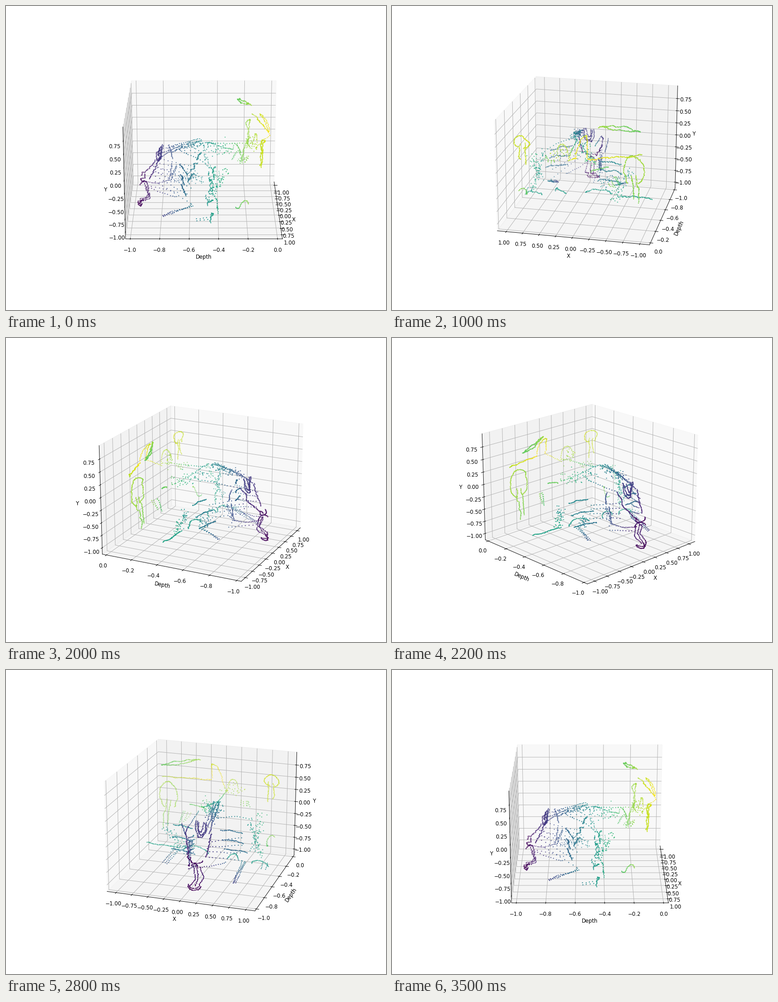
A matplotlib script that plays this animation: 837 by 669 pixels, repeating every 3600 ms.

```python
import numpy as np
import matplotlib.pyplot as plt
from matplotlib.animation import FuncAnimation

W, H, DPI = 837, 669, 83.7
FRAMES, ELEV = 36, 20
LIMITS = np.array([[-1.143, 1.137], [-1.033, 0.033], [-1.13, 1.01]])
SPAN, MID = LIMITS[:, 1] - LIMITS[:, 0], LIMITS.mean(axis=1)
BOX = np.array([1.1905, 1.1905, 0.8929])
SCALE, CX, CY, DIST = 2784.5, 435.9, 330.9, 10

rng = np.random.default_rng(4)
parts = []

# Camera of the front view in which the scene is sketched
e, a = np.radians(ELEV), np.radians(360 * 25 / 35)
FWD = np.array([np.cos(e) * np.cos(a), np.cos(e) * np.sin(a), np.sin(e)])
RIGHT = np.array([-np.sin(a), np.cos(a), 0])
UP = np.cross(FWD, RIGHT)


def lift(px, py, depth):
    """Turn front-view pixels with a known depth into data coordinates."""
    y = (depth - MID[1]) / SPAN[1] * BOX[1]
    ray = (-FWD + np.outer((px - CX) / SCALE, RIGHT)
           + np.outer((CY - py) / SCALE, UP))
    t = (y - DIST * FWD[1]) / ray[:, 1]
    return (DIST * FWD + t[:, None] * ray) / BOX * SPAN + MID


def wobble(n, size):
    """Smooth noise, so that strokes look hand drawn."""
    return size * np.convolve(rng.normal(size=n + 8), np.ones(9) / 3, "valid")


def add(px, py, depths, rough):
    n = len(px)
    depth = np.interp(np.linspace(0, 1, n),
                      np.linspace(0, 1, len(depths)), depths)
    depth = np.clip(depth + wobble(n, 0.006), -0.969, -0.031)
    parts.append(lift(px + wobble(n, 0.7) + rng.normal(0, rough, n),
                      py + wobble(n, 0.7) + rng.normal(0, rough, n), depth))


def trace(p, q, *depths, gap=1.4, bow=0, rough=0.25):
    """Dots from p to q, sagging by `bow` pixels in the middle."""
    (x0, y0), (x1, y1) = p, q
    t = np.linspace(0, 1, max(3, int(np.hypot(x1 - x0, y1 - y0) / gap)))
    add(x0 + (x1 - x0) * t, y0 + (y1 - y0) * t + bow * np.sin(np.pi * t),
        depths, rough)


def arc(cx, cy, rx, ry, start, stop, *depths, gap=1.4):
    """Dots on part of an ellipse, angles clockwise from the right."""
    length = np.radians(stop - start) * (rx + ry) / 2
    t = np.radians(np.linspace(start, stop, max(3, int(length / gap))))
    add(cx + rx * np.cos(t), cy + ry * np.sin(t), depths, 0.25)


def tree(cx, cy, rx, ry, half, foot, d, lean):
    arc(cx, cy, rx, ry, 110, 415, d, d + 0.02, d - 0.01, d)
    for side in (-1, 1):
        x = cx + side * half
        trace((x, cy + ry / 3), (x, foot - 4 * side), d, d - lean, gap=1.6)


def background():
    for bow in (-3, 4):
        trace((297, 229), (371, 203), -.25, -.23, -.17, bow=bow)
    tree(301, 294, 22, 30, 5, 366, -.175, .045)
    tree(522, 224, 17, 13, 6, 266, -.11, .0)

    # skyline with tower and hill
    trace((281, 256), (379, 245), -.14, -.04, bow=-1)
    arc(391, 241, 11, 31, 180, 360, -.035, -.1, -.035)
    trace((402, 242), (432, 264), -.04, -.13, gap=3)
    arc(444, 262, 15, 28, 180, 360, -.13, -.17, gap=3)
    trace((428, 262), (464, 250), -.2, -.13, gap=1.5, rough=8)

    # grass
    trace((364, 305), (399, 310), -.26, -.22, bow=-2)
    arc(540, 352, 6, 11, 60, 300, -.28, -.2)
    for i in range(4):
        trace((345 + 2 * i, 349 - 2 * i), (349 + 2 * i, 323 + i),
              -.3 + .02 * i, -.26 + .02 * i, gap=3)
    for i in range(5):
        trace((470 + 6 * i, 277), (473 + 6 * i, 286), -.18 - .015 * i,
              -.2 - .015 * i, gap=2.5)


def ground():
    trace((289, 406), (365, 403), -.42, -.44)
    for cx, rx, ry in ((412, 28, 11), (496, 13, 13), (552, 18, 8)):
        arc(cx, 404, rx, ry, 180, 350, -.46, -.44, -.47)
    for k in range(2):
        trace((567 - 8 * k, 398), (579 - 8 * k, 410), -.46, -.55, gap=3)

    # ledges on both sides and their feet
    for i in range(3):
        trace((370 + 2 * i, 353 + 27 * i), (418 + 7 * i, 354 + 27 * i),
              -.52 - .03 * i, -.56 - .03 * i, bow=-2)
        trace((502 + 3 * i, 343 + 20 * i), (540 + 6 * i, 341 + 20 * i),
              -.66, -.62, bow=-2)
    for k in range(3):
        trace((378 + 6 * k, 408), (378 + 6 * k, 438), -.56, -.72, gap=2.8)
        trace((533 + 5 * k, 403), (548 + 3 * k, 449), -.58, -.78, gap=2.8)


def body():
    # back, running away from the viewer
    for k in range(3):
        trace((505 - 9 * k, 353 - 14 * k), (475 - 6 * k, 285),
              -.83 + .04 * k, -.52, gap=1.8 + .3 * k, bow=-4)
    trace((470, 284), (398, 306), -.5, -.3, gap=3)
    trace((460, 285), (430, 260), -.46, -.14, gap=2)
    trace((492, 316), (532, 312), -.64, -.43, gap=3, bow=-5)

    # flanks
    trace((428, 344), (432, 368), -.76, -.72)
    trace((451, 347), (428, 312), -.8, -.52, gap=3)
    trace((533, 314), (546, 386), -.47, -.4, rough=3)
    for k in range(4):
        trace((507, 368 + 12 * k), (536, 352 + 16 * k), -.84, -.6, gap=2.8)
        trace((452, 372 + 11 * k), (424, 366 + 10 * k), -.82, -.56, gap=2.8)

    # loose dots
    trace((490, 322), (470, 290), -.74, -.5, gap=.6, rough=6)
    trace((455, 300), (400, 304), -.5, -.28, gap=1, rough=8)
    trace((352, 366), (366, 398), -.5, -.38, gap=.6, rough=7)
    trace((538, 300), (543, 376), -.34, -.48, gap=1.5, rough=5)
    trace((392, 404), (412, 394), -.62, -.5, gap=.8, rough=6)
    trace((440, 376), (446, 414), -.7, -.74, gap=1.5, rough=3)


def head():
    # ears and brow
    for k in range(3):
        arc(482, 330 + k, 14 - 4 * k, 35 - 7 * k, 0, 180, -.8, -.82, -.79)
    trace((451, 347), (456, 378), -.8, -.84)
    trace((456, 378), (480, 418), -.84, -.94)
    trace((507, 352), (507, 404), -.81, -.88)
    trace((441, 375), (446, 415), -.72, -.75, gap=2)
    trace((446, 415), (478, 430), -.75, -.93, gap=1.8, bow=5)

    # muzzle
    arc(491, 414, 14, 7, 0, 200, -.92, -.95, -.91)
    arc(489, 430, 11, 7, 180, 360, -.9, -.95)
    for x in (481, 489, 499):
        trace((x, 428), (x + 5, 470), -.91, -.89, -.95, gap=1.7)
    for k in range(2):
        arc(490, 471, 15 - 5 * k, 10 - 5 * k, 0, 180, -.94, -.968, -.94)

    # neck
    for side in (-1, 1):
        trace((484 + 14 * side, 434 - 4 * side),
              (484 + 32 * side, 420 - 10 * side), -.9, -.7, gap=2)


for draw in (background, ground, body, head):
    draw()
x, depth, y = np.vstack(parts).T

fig = plt.figure(figsize=(W / DPI, (H + 0.01) / DPI), dpi=DPI)
ax = fig.add_subplot(projection="3d")
ax.scatter(x, depth, y, c=depth, s=1, cmap="viridis",
           vmin=-0.969, vmax=-0.031)
ax.set(xlabel="X", ylabel="Depth", zlabel="Y",
       xlim=LIMITS[0], ylim=LIMITS[1], zlim=LIMITS[2],
       xticks=np.linspace(-1, 1, 9), yticks=np.linspace(-1, 0, 6),
       zticks=np.linspace(-1, 0.75, 8))


def update(i):
    ax.view_init(elev=ELEV, azim=360 * i / (FRAMES - 1))
    return ()


anim = FuncAnimation(fig, update, frames=FRAMES, interval=100, repeat=True,
                     repeat_delay=0, init_func=lambda: update(0))
plt.show()
```
